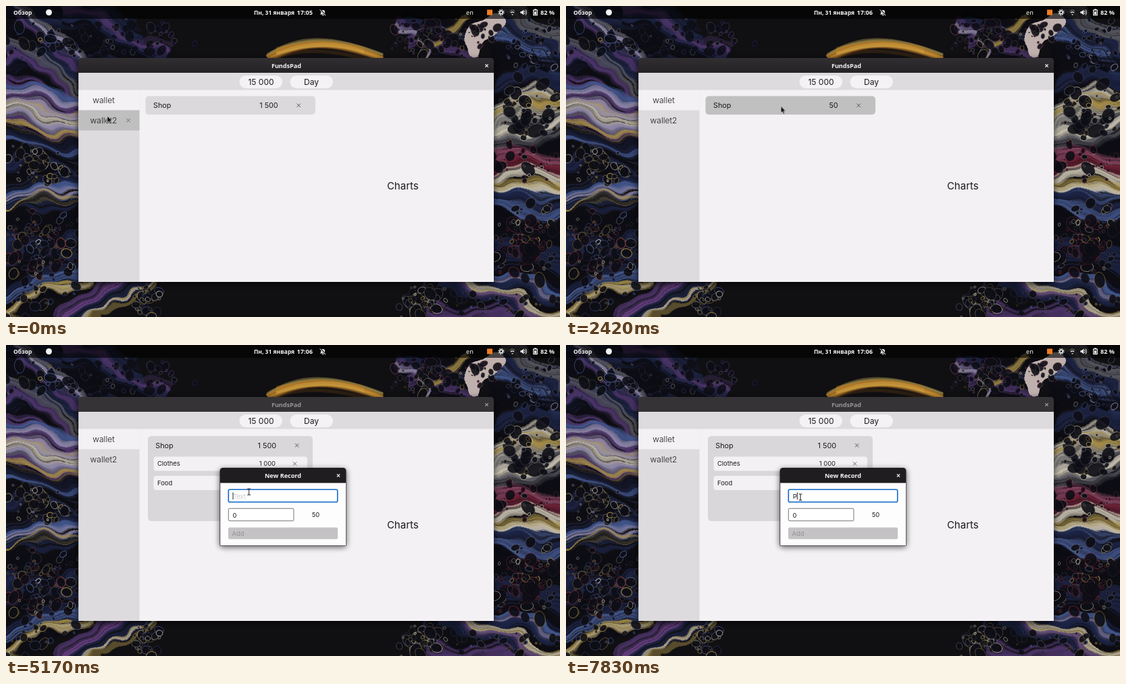
An HTML page with a canvas that plays this animation: 820x461 px, repeating every 8000 ms.

```html
<!DOCTYPE html>
<html lang="ru">
<head>
<meta charset="utf-8">
<title>Wallet demo</title>
<style>
html, body { margin: 0; width: 100%; height: 100%; overflow: hidden; background: #111016; }
canvas, svg { position: absolute; left: 0; top: 0; width: 100vw; height: 100vh; display: block; }
text { font-family: Inter, sans-serif; fill: #1c1b1c; white-space: pre; }
.bar text, .title { font: 700 9.1px "Noto Sans", "Open Sans", sans-serif; fill: #f4f4f4; }
.bar .date { font-weight: 600; font-size: 8.5px; }
.mid { text-anchor: middle; }
.end { text-anchor: end; }
.s12 { font-size: 12px; }
.tab { font-size: 12px; font-weight: 300; }
.s11 { font-size: 10.8px; }
.s9 { font-size: 9.4px; }
.x { stroke: #6a696a; stroke-width: 1; fill: none; }
.x.light { stroke: #fff; stroke-width: 1.4; }

/* Every part shares one eight-second clock. */
.step { animation: 8s step-end infinite; }
.ease { animation: 8s ease-in-out infinite; }
.selected { animation-name: selected; }
.hovered { animation-name: hovered; }
.close1 { animation-name: close1; }
.close2 { animation-name: close2; }
.first { animation-name: first; }
.second { animation-name: second; }
.before { animation-name: before; }
.after { animation-name: after; }
.left { animation-name: left; }
.spent { animation-name: spent; }
.rows { animation-name: rows; }
.active { animation-name: active; }
.dimmed { animation-name: dimmed; }
.arrow { animation-name: arrow; }
.beam { animation-name: beam; }
.empty { animation-name: empty; }
.typed { animation-name: typed; }
.card { animation: cardFill 8s step-end infinite, cardGrow 8s ease-in-out infinite; }
.head { animation-name: head; }
.tail { animation-name: tail; }
.pointer { animation-name: pointer; }
.dialog { transform-origin: 410px 240px; animation: dialog 8s ease-out infinite; }
.caret { animation: blink 1s step-end infinite; }

@keyframes selected { 0%, 20% { transform: none } 5.2% { transform: translateY(30px) } }
@keyframes hovered {
  0%, 5.19% { transform: translateY(30px); fill: #c0bfc0; opacity: 1 }
  5.2% { transform: translateY(30px); fill: #c0bfc0; opacity: 0 }
  16.6% { transform: none; fill: #c0bfc0; opacity: 0 }
  18.6%, 19.99% { transform: none; fill: #c0bfc0; opacity: 1 }
  20%, 100% { transform: none; fill: #c0bfc0; opacity: 0 }
}
@keyframes close1 { 0%, 16.6% { opacity: 0 } 18.6%, 25.8% { opacity: 1 } 27%, 100% { opacity: 0 } }
@keyframes close2 { 0%, 18% { opacity: 1 } 19.2%, 100% { opacity: 0 } }
@keyframes first { 0% { opacity: 1 } 5.2% { opacity: 0 } 20%, 100% { opacity: 1 } }
@keyframes second { 0% { opacity: 0 } 5.2% { opacity: 1 } 20%, 100% { opacity: 0 } }
@keyframes before { 0% { opacity: 1 } 28%, 100% { opacity: 0 } }
@keyframes after { 0% { opacity: 0 } 28%, 100% { opacity: 1 } }
@keyframes left { 0% { opacity: 0 } 26.2% { opacity: 1 } 57%, 100% { opacity: 0 } }
@keyframes spent { 0% { opacity: 1 } 26.2% { opacity: 0 } 57%, 100% { opacity: 1 } }
@keyframes rows { 0%, 36.6% { opacity: 0 } 38.6%, 100% { opacity: 1 } }
@keyframes active { 0% { opacity: 1 } 57%, 100% { opacity: 0 } }
@keyframes dimmed { 0% { opacity: 0 } 57%, 100% { opacity: 1 } }
@keyframes arrow { 0% { opacity: 1 } 59.6%, 100% { opacity: 0 } }
@keyframes beam { 0% { opacity: 0 } 59.6%, 100% { opacity: 1 } }
@keyframes empty { 0% { opacity: 1 } 96.5%, 100% { opacity: 0 } }
@keyframes typed { 0% { opacity: 0 } 96.5%, 100% { opacity: 1 } }
@keyframes cardFill { 0% { fill: #dbd9db } 26.2% { fill: #c1c0c1 } 57%, 100% { fill: #d9d7d9 } }
@keyframes cardGrow {
  0%, 36% { x: 206.5px; y: 133.5px; width: 251.5px; height: 27.5px }
  39%, 100% { x: 210px; y: 135px; width: 244px; height: 126px }
}
@keyframes head { 0%, 36% { transform: none } 39%, 100% { transform: translate(3.3px, 1.5px) } }
@keyframes tail { 0%, 36% { transform: none } 39%, 100% { transform: translate(-2.6px, 1.5px) } }
@keyframes dialog {
  0%, 57% { transform: scaleY(0); opacity: 0 }
  58.6%, 100% { transform: none; opacity: 1 }
}
@keyframes blink { 0% { opacity: 1 } 60%, 100% { opacity: 0 } }
@keyframes pointer {
  0%, 12% { transform: translate(150px, 163px) }
  16.5%, 21% { transform: translate(153px, 144px) }
  33%, 41% { transform: translate(338px, 149px) }
  48%, 57% { transform: translate(333px, 237px) }
  63.5%, 66% { transform: translate(359.5px, 217.5px) }
  71%, 100% { transform: translate(347px, 225.5px) }
}
</style>
</head>
<body>
<canvas id="wall" width="820" height="461"></canvas>
<svg viewBox="0 0 820 461" preserveAspectRatio="none">
  <defs>
    <path id="x" d="M-2.7-2.7 2.7 2.7M2.7-2.7-2.7 2.7"/>
    <linearGradient id="chrome" x2="0" y2="1"><stop stop-color="#302e30"/><stop offset="1" stop-color="#242224"/></linearGradient>
    <filter id="soft" x="-20%" y="-20%" width="140%" height="140%"><feGaussianBlur stdDeviation="4"/></filter>
  </defs>

  <g class="bar">
    <rect width="820" height="19" fill="#000" opacity=".62"/>
    <text x="11" y="13" class="date">Обзор</text>
    <circle cx="63.5" cy="9.5" r="4.5" fill="#f4f4f4"/>
    <text x="367" y="13" class="date">Пн, 31 января</text>
    <text x="454" y="13" class="end step before">17:05</text>
    <text x="454" y="13" class="end step after">17:06</text>
    <path d="M465 12.5c1-1 1-2 1-3.5a3 3 0 0 1 6 0c0 1.5 0 2.5 1 3.5zM468 13.2h2.4v1h-2.4z" fill="#f4f4f4"/>
    <path d="M464.5 5 473.5 14" stroke="#111" stroke-width="2.2"/>
    <path d="M464.5 5.5 473 14" stroke="#f4f4f4"/>
    <text x="681" y="13" style="font-weight:500">en</text>
    <rect x="712" y="5.5" width="8" height="8" fill="#ee7b22"/>
    <g fill="none" stroke="#f4f4f4">
      <circle cx="733" cy="9.5" r="2.2" stroke-width="1.5"/>
      <circle cx="733" cy="9.5" r="3.9" stroke-width="1.4" stroke-dasharray="1.5 1.56"/>
      <path d="M745.5 8a5 5 0 0 1 8 0" opacity=".5"/>
      <path d="M747 10a3.3 3.3 0 0 1 5 0" stroke-width="1.3"/>
      <path d="M767.5 7a4 4 0 0 1 0 5M769 5.5a6 6 0 0 1 0 8"/>
      <rect x="780.7" y="6" width="5.6" height="7.5" stroke-width="1.2"/>
    </g>
    <path d="M748.3 12h2.4l-1.2 2zM761.5 8h2l2.8-2.5v8l-2.8-2.5h-2zM782 4.5h3v1.5h-3zM782 8.3h3v4.2h-3z" fill="#f4f4f4"/>
    <text x="812" y="13" class="end">82 %</text>
  </g>

  <rect x="106" y="79" width="617" height="333" rx="5" opacity=".65" filter="url(#soft)"/>
  <g>
    <path d="M107 100V82q0-5 5-5H717q5 0 5 5V100z" fill="url(#chrome)"/>
    <path class="step dimmed" d="M107 100V82q0-5 5-5H717q5 0 5 5V100z" fill="#353335"/>
    <g class="step active">
      <text x="415" y="91.7" class="title mid">FundsPad</text>
      <use href="#x" class="x light" transform="translate(711.5 88.5) scale(.8)"/>
    </g>
    <g class="step dimmed">
      <text x="415" y="91.7" class="title mid" style="fill:#969496">FundsPad</text>
      <use href="#x" class="x light" style="stroke:#a5a3a5" transform="translate(711.5 88.5) scale(.8)"/>
    </g>
    <path fill="#f3f1f3" d="M107.5 99H722V409H107.5z"/>
    <path fill="#dddbdd" d="M107.5 99H722V124.5H197.5V409H107.5z"/>
    <rect class="step selected" x="107.5" y="124.5" width="90" height="30" fill="#f3f1f3"/>
    <rect class="ease hovered" x="107.5" y="124.5" width="90" height="30"/>
    <text x="144.5" y="143.8" class="tab mid">wallet</text>
    <text x="144.5" y="173.8" class="tab mid">wallet2</text>
    <g class="ease close1"><use href="#x" class="x" transform="translate(181 139.5)"/></g>
    <g class="ease close2"><use href="#x" class="x" transform="translate(181 169.5)"/></g>

    <rect x="345.5" y="103" width="63.5" height="19" rx="9.5" fill="#f4f2f4"/>
    <rect x="420.5" y="103" width="63.5" height="19" rx="9.5" fill="#f4f2f4"/>
    <g class="step second">
      <text x="377.5" y="116.5" class="s12 mid">5 000</text>
      <text x="452" y="116.5" class="s12 mid">Month</text>
    </g>
    <g class="step first">
      <text x="377.5" y="116.5" class="s12 mid">15 000</text>
      <text x="452" y="116.5" class="s12 mid">Day</text>
      <rect class="card" rx="5"/>
      <text x="218" y="151.2" class="s11 ease head">Shop</text>
      <g class="ease tail">
        <text x="402.7" y="151.2" class="s11 end step spent">1 500</text>
        <text x="402.7" y="151.2" class="s11 end step left">50</text>
        <use href="#x" class="x" style="stroke:#565556" transform="translate(433.2 147.3)"/>
      </g>
      <g class="ease rows">
        <rect x="218.5" y="165.5" width="227.5" height="21" rx="4" fill="#f3f1f3"/>
        <rect x="218.5" y="194" width="227.5" height="21" rx="4" fill="#f3f1f3"/>
        <text x="224" y="179" class="s9">Clothes</text>
        <text x="399" y="179" class="s9 end">1 000</text>
        <text x="224" y="207.8" class="s9">Food</text>
        <text x="399" y="207.8" class="s9 end">450</text>
        <use href="#x" class="x" transform="translate(427.5 176)"/>
        <use href="#x" class="x" transform="translate(427.5 204.8)"/>
      </g>
    </g>
    <text x="587.3" y="272" class="mid" font-size="15">Charts</text>
  </g>

  <g class="dialog">
    <rect x="316" y="184" width="188" height="116" rx="5" opacity=".6" filter="url(#soft)"/>
    <path d="M316.5 297.5V187q0-5 5-5H498.5q5 0 5 5V297.5z" fill="#1f1d1f"/>
    <path d="M317.2 204.5H503V297H317.2z" fill="#fdfdfd"/>
    <text x="410" y="197" class="title mid">New Record</text>
    <use href="#x" class="x light" transform="translate(492 193.5) scale(.8)"/>
    <rect x="329.3" y="214.3" width="161.4" height="18.4" rx="2" fill="#fff" stroke="#0d69c4" stroke-width="1.6"/>
    <g class="step empty">
      <text x="336" y="227.5" class="s9" style="fill:#c9c8c9">Text</text>
      <path class="caret" d="M336 218.5V229" stroke="#222"/>
    </g>
    <g class="step typed">
      <text x="335.7" y="227.5" class="s9">P</text>
      <path d="M342.3 218.5V229" stroke="#222"/>
    </g>
    <rect x="329.3" y="242.3" width="96.6" height="18.4" rx="2" fill="#fff" stroke="#777577"/>
    <text x="335.5" y="255.5" class="s9">0</text>
    <text x="458.5" y="254.8" class="s9 mid">50</text>
    <rect x="329" y="270.5" width="162" height="17.3" rx="2" fill="#c4c2c4"/>
    <text x="334.5" y="282.5" class="s9" style="fill:#959395">Add</text>
  </g>

  <g class="ease pointer">
    <path class="step arrow" d="M0 0V10L2.2 8 3.9 11.7 5.4 11 3.8 7.4H6.8z" fill="#111" stroke="#eee" stroke-width=".5"/>
    <path class="step beam" d="M-2.5-4.8Q0-4.8 0-3.5Q0-4.8 2.5-4.8M0-4V4M-2.5 4.8Q0 4.8 0 3.5Q0 4.8 2.5 4.8" fill="none" stroke="#222" stroke-width="1.1"/>
  </g>
</svg>
<script>
const ctx = document.getElementById('wall').getContext('2d');
const W = 820, H = 461, { sin, round, min, max } = Math;
let seed = 31;
const rand = () => (seed = seed * 16807 % 2147483647) / 2147483647;
const spread = size => (rand() - .5) * size;
const pick = list => list[Math.floor(rand() * list.length)];

const yellow = '#a8904a', cream = '#c6bfae', navy = '#1d2444', blue = '#44588f';
const violet = '#4c3568', lilac = '#8f87a8', ink = '#0d0d15', pink = '#8d4763', grey = '#56565f';

// A poured stripe: soft strands along one curve.
function band(colors, width, x0, y0, cx, cy, x1, y1) {
  const strands = Math.ceil(width / 1.4);
  for (let i = 0; i < strands; i++) {
    const off = (i / strands - .5) * width;
    ctx.strokeStyle = colors[Math.floor(i / strands * colors.length)];
    ctx.globalAlpha = .25 + rand() * .45;
    ctx.lineWidth = 1.5 + rand() * 4;
    ctx.beginPath();
    ctx.moveTo(x0, y0 + off + spread(5));
    ctx.quadraticCurveTo(cx + spread(14), cy + off + spread(14), x1, y1 + off + spread(7));
    ctx.stroke();
  }
  ctx.globalAlpha = 1;
}

// Bends the stripes into marbled swirls.
function swirl() {
  const from = ctx.getImageData(0, 0, W, H), to = ctx.createImageData(W, H);
  const source = new Uint32Array(from.data.buffer), result = new Uint32Array(to.data.buffer);
  for (let y = 0; y < H; y++) for (let x = 0; x < W; x++) {
    const sx = x + 8 * sin(y / 17 + 2 * sin(x / 31)) + 3 * sin(y / 6 + x / 9);
    const sy = y + 7 * sin(x / 19 + 1.5 * sin(y / 23)) + 2.5 * sin(x / 7 - y / 11);
    result[y * W + x] = source[max(0, min(H - 1, round(sy))) * W + max(0, min(W - 1, round(sx)))];
  }
  ctx.putImageData(to, 0, 0);
}

// Dark bubbles with thin coloured rims, densest in the middle of their patch.
function cells(x, y, w, h, count, size, rims) {
  const near = () => (rand() + rand()) * .6 - .1;
  for (let i = 0; i < count; i++) {
    const r = size * (.15 + .85 * rand() ** 2.5);
    ctx.beginPath();
    ctx.ellipse(x + near() * w, y + near() * h, r * (.9 + rand() * .4), r * .85, spread(3), 0, 7);
    ctx.globalAlpha = .9;
    ctx.fillStyle = ink;
    ctx.fill();
    ctx.globalAlpha = .35 + rand() * .5;
    ctx.strokeStyle = pick(rims);
    ctx.lineWidth = .4 + rand() * .9;
    ctx.stroke();
  }
  ctx.globalAlpha = 1;
}

ctx.fillStyle = '#100f12';
ctx.fillRect(0, 0, W, H);

// Left side
band([navy, ink, navy], 110, -10, 40, 60, 40, 200, 70);
band([grey, lilac, navy, violet], 34, 20, 10, 60, 40, 125, 95);
band([violet, navy, ink], 30, 90, 10, 150, 40, 240, 80);
band([grey, violet, ink, violet], 55, -10, 80, 50, 85, 115, 150);
band([blue, lilac, violet, yellow], 32, -10, 125, 50, 140, 115, 150);
band([lilac, cream, lilac, violet], 42, -10, 155, 50, 165, 115, 185);
band([yellow, ink, navy, blue], 32, -10, 192, 50, 190, 115, 210);
band([ink, navy, ink], 45, -10, 235, 50, 225, 115, 245);
band([navy, blue, lilac, blue, navy], 42, -10, 285, 50, 285, 115, 265);
band([yellow, ink], 9, -10, 318, 60, 270, 115, 290);
band([ink, navy, ink], 105, -10, 362, 50, 360, 115, 350);
band([navy, blue, ink], 46, -10, 440, 50, 420, 115, 385);
band([yellow, cream, yellow, ink], 18, 5, 470, 50, 420, 130, 405);
band([violet, '#6d4286', navy], 46, 70, 475, 130, 430, 210, 390);
band([cream, yellow], 5, 120, 465, 170, 435, 225, 405);

// Right side
band([ink, navy, ink, violet, ink], 70, 590, 45, 620, 40, 700, 60);
band([yellow, ink, yellow], 10, 612, 78, 635, 35, 690, 15);
band([violet, lilac], 16, 580, 25, 610, 45, 625, 85);
band([grey, navy, blue, ink], 80, 725, 35, 780, 40, 830, 95);
band([ink, navy, ink], 70, 715, 115, 770, 100, 830, 110);
band([cream, yellow, cream, grey], 48, 715, 190, 770, 130, 830, 150);
band([cream, grey, ink], 45, 715, 215, 770, 195, 830, 185);
band([pink, '#6c2035', cream], 42, 715, 240, 770, 225, 830, 245);
band([yellow, cream, blue], 22, 715, 265, 770, 285, 830, 265);
band([navy, blue, ink], 48, 715, 290, 770, 315, 830, 310);
band([ink, navy, ink], 110, 715, 370, 770, 360, 830, 380);
band([navy, ink, violet], 65, 620, 435, 690, 425, 830, 450);
band([yellow, cream, violet, navy], 24, 640, 405, 720, 420, 830, 472);
band([blue, lilac, navy], 22, 710, 400, 760, 405, 830, 435);
ctx.fillStyle = '#bfb0ad';
ctx.beginPath();
ctx.ellipse(705, 43, 33, 18, -.65, 0, 7);
ctx.fill();
swirl();

// Ring behind the window
band([yellow, '#b97a25', '#c98f35', '#5d3813'], 15, 386, 80, 455, 38, 558, 80);
band(['#b97a25', '#c79a40'], 6, 400, 67, 470, 48, 530, 66);

cells(0, 20, 107, 65, 45, 9, [lilac, grey, blue, yellow]);
cells(110, 20, 160, 57, 75, 9, [navy, grey, violet]);
cells(0, 205, 107, 55, 75, 9, [cream, grey, lilac, yellow]);
cells(0, 305, 107, 95, 140, 9, [cream, grey, '#843e43', yellow, blue]);
cells(0, 400, 100, 60, 35, 8, [yellow, grey, blue]);
cells(185, 410, 50, 50, 50, 8, [yellow, cream, grey, blue]);
cells(575, 20, 100, 57, 85, 9, [yellow, grey, violet, pink]);
cells(681, 25, 48, 38, 20, 9, [cream, pink, grey]);
cells(740, 20, 80, 85, 55, 9, [grey, blue, lilac]);
cells(722, 115, 98, 85, 60, 12, [cream, yellow, grey]);
cells(722, 205, 98, 55, 30, 10, [pink, cream, '#8c2438']);
cells(722, 295, 98, 108, 95, 13, [grey, cream, yellow, '#752735']);
cells(580, 412, 70, 48, 65, 10, [yellow, grey, cream]);
cells(650, 425, 165, 36, 35, 7, [yellow, blue, grey]);
</script>
</body>
</html>
```
